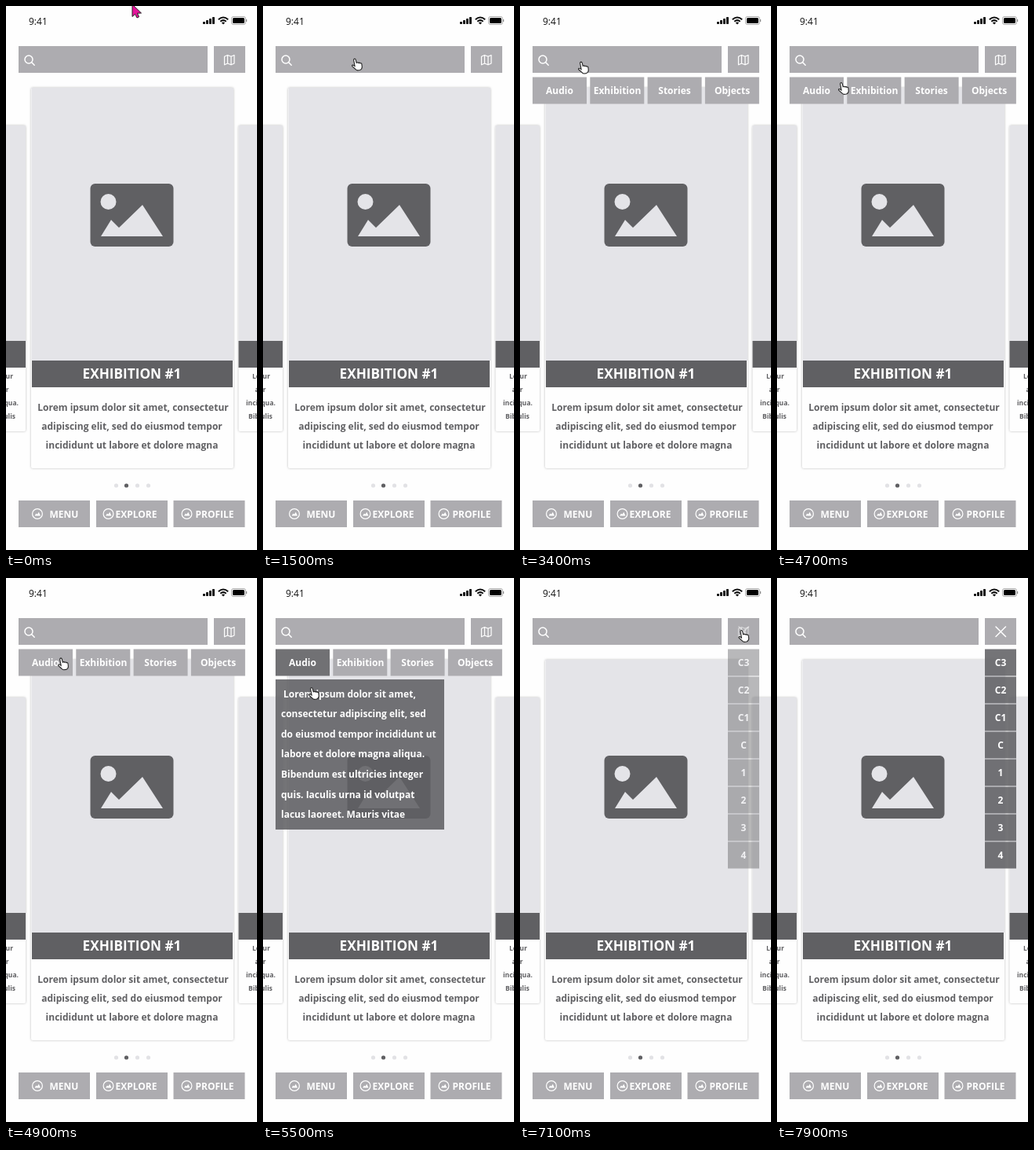
Recreate the animation shown at these times as an HTML page. Size 320 px wide and 692 px high, loop 8000 ms.

```html
<!DOCTYPE html>
<html lang="en">
<head>
<meta charset="utf-8">
<title>Gallery app wireframe</title>
<style>
  html, body { margin: 0; width: 100%; height: 100%; overflow: hidden; background: #fefefe; }
  svg { display: block; width: 320px; height: 692px; }
  text { font: 700 12px "Open Sans", sans-serif; fill: #fff; }
  .mid { text-anchor: middle; }
  .end { text-anchor: end; }
  .body { fill: #606063; }
  .small { font-size: 8.5px; fill: #606063; }
  .title { font-size: 17.2px; }
  .clock { font-weight: 500; fill: #111; }
  .line { fill: none; stroke: #fff; stroke-width: 1.5; stroke-linecap: round; stroke-linejoin: round; }
  .card { fill: #fefefe; filter: drop-shadow(0 0 1.5px #bbb); }
</style>
</head>
<body>
<svg id="stage" viewBox="0 0 320 692"></svg>
<script>
const LOOP = 8000;
const GREY = '#adacb0', DARK = '#606063', PALE = '#e4e4e8';
const stage = document.getElementById('stage');

const rect = (x, y, w, h, fill, extra = '') =>
  `<rect x="${x}" y="${y}" width="${w}" height="${h}" fill="${fill}" ${extra}/>`;
const text = (x, y, str, cls = '') => `<text x="${x}" y="${y}" class="${cls}">${str}</text>`;
const path = (d, extra = 'class="line"') => `<path d="${d}" ${extra}/>`;
const group = (id, inner) => `<g id="${id}">${inner}</g>`;

function statusBar() {
  const bars = [3, 5, 7, 9].map((h, i) =>
    rect(251 + i * 4, 23 - h, 3, h, '#111', 'rx=".7"')).join('');
  const arcs = path('M270.8 17.2Q277 11.8 283.2 17.2M273.3 19.7Q277 16.6 280.7 19.7',
    'fill="none" stroke="#111" stroke-width="2"');
  const battery = rect(287.5, 13.5, 18, 10, 'none', 'rx="2.5" stroke="#999" stroke-width=".8"') +
    rect(289, 15, 15, 7, '#000', 'rx="1.5"') + rect(306, 17, 1.2, 3, '#999');
  return text(29, 24, '9:41', 'clock') + bars + arcs +
    path('M274.8 21.2Q277 19.6 279.2 21.2L277 23.6Z', 'fill="#111"') + battery;
}

function sideCard(x, textX, cls, lines) {
  return rect(x, 152, 60, 389, '#fff', 'class="card" rx="2"') +
    rect(x, 152, 60, 274, PALE) + rect(x, 426, 60, 34, DARK) +
    lines.map((s, i) => text(textX[i], 474 + i * 17, s, 'small ' + cls)).join('');
}

function mainCard() {
  const lines = [
    'Lorem ipsum dolor sit amet, consectetur',
    'adipiscing elit, sed do eiusmod tempor',
    'incididunt ut labore et dolore magna'];
  const centres = [162, 160.5, 160.5];
  return rect(32, 104, 258, 484, '#fff', 'class="card" rx="2"') +
    rect(32.5, 104, 257.5, 347, PALE) +
    rect(107.5, 226, 106, 80, DARK, 'rx="6"') +
    `<circle cx="130.5" cy="249" r="10" fill="${PALE}"/>` +
    path('M121 293L134 272L144 282L174 253L200 293Z', `fill="${PALE}"`) +
    rect(33, 451, 256, 34, DARK) + text(160.5, 474, 'EXHIBITION #1', 'title mid') +
    lines.map((s, i) => text(centres[i], 515 + i * 24, s, 'body mid')).join('');
}

function pager() {
  return [140.5, 153.5, 167.5, 181.5].map((x, i) =>
    `<circle cx="${x}" cy="610" r="2.6" fill="${i === 1 ? DARK : '#e2e2e5'}"/>`).join('');
}

function navButton(x, iconX, textX, label) {
  return rect(x, 629, 91, 34, GREY) +
    `<circle cx="${iconX}" cy="646" r="6.4" class="line" style="stroke-width:1.2"/>` +
    path(`M${iconX - 3.5} 648.5l2-3l1.3 1.3l2-3l2.2 4.7z`, 'fill="#fff"') +
    text(textX, 650.5, label);
}

function tabs() {
  const labels = ['Audio', 'Exhibition', 'Stories', 'Objects'];
  const centres = [50.5, 124, 197, 270.5];
  return labels.map((s, i) =>
    rect(16 + i * 73.3, 90.5, 69, 34, GREY, i ? '' : 'id="audio"') +
    text(centres[i], 111.5, s, 'mid')).join('');
}

function panel() {
  const lines = [
    'Lorem ipsum dolor sit amet,',
    'consectetur adipiscing elit, sed',
    'do eiusmod tempor incididunt ut',
    'labore et dolore magna aliqua.',
    'Bibendum est ultricies integer',
    'quis. Iaculis urna id volutpat',
    'lacus laoreet. Mauris vitae'];
  return rect(16, 129, 215, 191, DARK, 'opacity=".87"') +
    lines.map((s, i) => text(i ? 23 : 26, 151.5 + i * 25.6, s)).join('');
}

function floorMenu() {
  return ['C3', 'C2', 'C1', 'C', '1', '2', '3', '4'].map((s, i) =>
    rect(265, 90.5 + i * 35, 40, 34, DARK, 'opacity=".87"') +
    text(285, 112 + i * 35, s, 'mid')).join('');
}

const ARROW = 'M0 0L0 15.5L3.6 12.3L6 17L8.6 15.8L6.4 11.2L11.5 11Z';
const HAND = 'M0 9.5L-1.4 2.2Q-1.5 .6 -.2 .5Q.9 .5 1.2 1.8L2.2 5.8Q4 4.6 4.6 6' +
  'Q6.2 5 6.8 6.4Q8.4 5.8 8.9 7.4L9.3 11Q9.3 14 6.5 15L3.5 15.4Q2 15.2 .6 13.6' +
  'L-3 10.4Q-4 9.2 -2.8 8.6Q-1.6 8.4 0 10Z';

stage.innerHTML = rect(0, 0, 320, 692, '#fefefe') + statusBar() +
  rect(16, 51, 241, 34, GREY) +
  '<circle cx="29" cy="68" r="5" class="line"/>' + path('M32.8 71.8L36.2 75.2') +
  sideCard(-35, [9, 3.5, 16, 12], 'end', ['consectetur', 'tempor', 'magna aliqua.', 'quis. Iaculis']) +
  sideCard(296.5, [314, 317.5, 306, 309], '', ['Lorem', 'adipiscing', 'incididunt', 'Bibendum']) +
  mainCard() + pager() +
  navButton(16, 40, 55.5, 'MENU') + navButton(115, 130.5, 139.5, 'EXPLORE') +
  navButton(213.5, 230.5, 241.5, 'PROFILE') +
  rect(265, 51, 40, 34, GREY) +
  group('map', path('M278.5 64.2L282.5 62.5L287 64.2L291 62.5V73L287 74.8L282.5 73L278.5 74.8Z' +
    'M282.5 62.5V73M287 64.2V74.8', 'class="line" style="stroke-width:1.2"')) +
  group('close', path('M279 62L291.5 74.5M291.5 62L279 74.5')) +
  group('tabs', tabs()) + group('panel', panel()) + group('floors', floorMenu()) +
  group('cursor',
    path(ARROW, 'id="arrow" fill="#e6149b" stroke="#222" stroke-width="1"') +
    path(HAND, 'id="hand" fill="#fff" stroke="#222" stroke-width="1.1"') );

const el = id => document.getElementById(id);
const [mapIcon, closeIcon, tabRow, audioTab, infoPanel, floors, cursor, arrow, hand] =
  ['map', 'close', 'tabs', 'audio', 'panel', 'floors', 'cursor', 'arrow', 'hand'].map(el);

// Pointer tip: time, x, y
const route = [
  [0, 161, -2], [200, 160, 4], [900, 128, 62], [1500, 117, 66.5], [2300, 94, 69],
  [3000, 78, 70], [3700, 78, 71], [4300, 84, 92], [4700, 82, 97], [5000, 66, 103],
  [5200, 62, 112], [5500, 62, 139], [5800, 66, 128], [6200, 87, 72], [6900, 280, 66],
  [7250, 284, 66], [7650, 326, 110], [8000, 326, 110]];

function pointAt(t) {
  const i = route.findIndex(p => p[0] > t);
  const [t0, x0, y0] = route[i - 1], [t1, x1, y1] = route[i];
  const k = (t - t0) / (t1 - t0), e = k * k * (3 - 2 * k);
  return [x0 + (x1 - x0) * e, y0 + (y1 - y0) * e];
}

const FADE = 200;
const clamp = v => Math.max(0, Math.min(1, v));
const shown = (t, from, to) => clamp((t - from) / FADE) * clamp((to - t) / FADE);
const within = (t, a, b) => t >= a && t < b;

function draw(now) {
  const t = Math.floor((now % LOOP) / 100) * 100;
  const [x, y] = pointAt(t);
  const isHand = within(t, 900, 5900) || t >= 6800;
  cursor.setAttribute('transform', `translate(${x.toFixed(1)} ${y.toFixed(1)})`);
  arrow.style.display = isHand ? 'none' : '';
  hand.style.display = isHand ? '' : 'none';

  tabRow.style.opacity = shown(t, 2500, 6100);
  infoPanel.style.opacity = shown(t, 5000, 6100);
  audioTab.setAttribute('fill', t >= 5100 ? '#717174' : GREY);

  const open = shown(t, 7000, LOOP + FADE);
  floors.style.opacity = closeIcon.style.opacity = open;
  mapIcon.style.opacity = 1 - open;
}

const start = performance.now();
function tick() {
  draw(performance.now() - start);
  requestAnimationFrame(tick);
}
tick();
</script>
</body>
</html>
```
